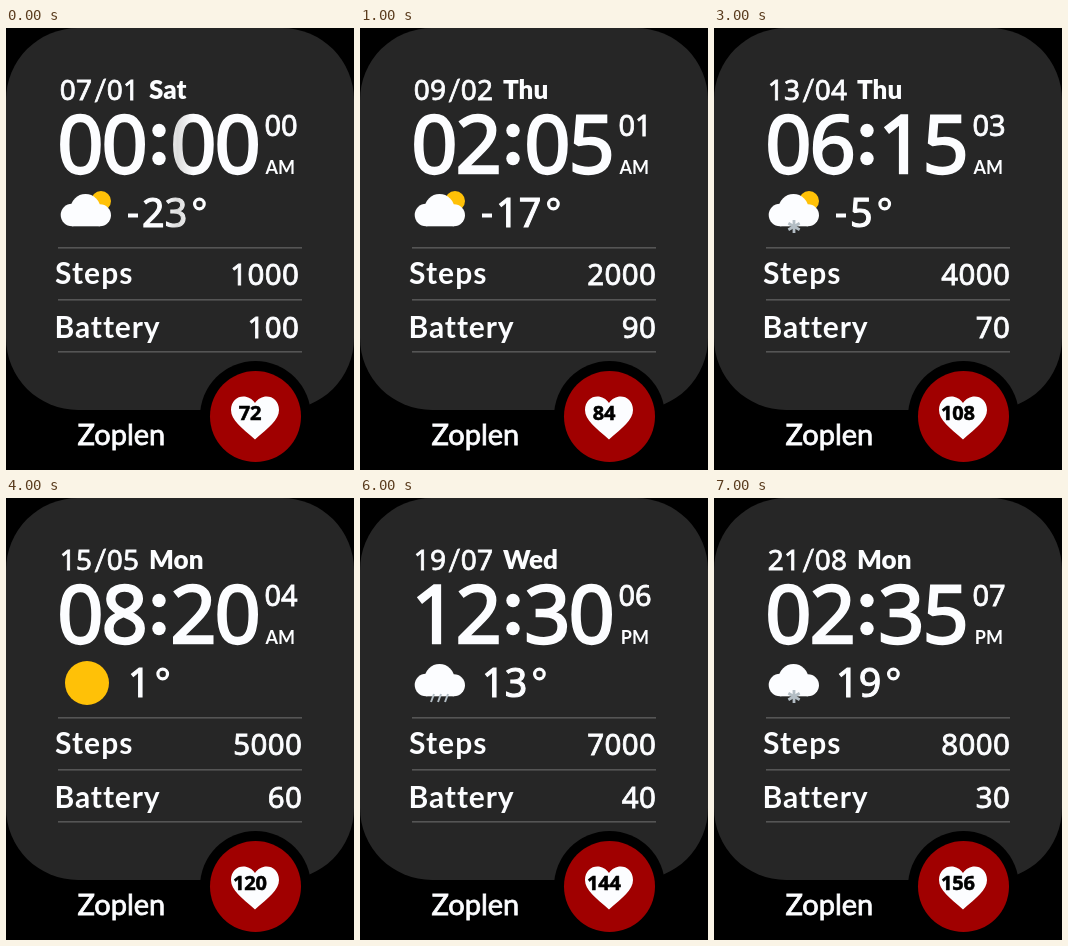
These frames come from a looping animation (348x442 px, 8 s). An HTML page with a canvas:

```html
<!DOCTYPE html>
<html lang="en">
<head>
<meta charset="utf-8">
<title>Watch face</title>
<style>
html, body { margin: 0; width: 100%; height: 100%; overflow: hidden; background: #000; }
canvas { display: block; width: 348px; height: 442px; }
</style>
</head>
<body>
<canvas id="face"></canvas>
<script>
const W = 348, H = 442, STEP = 1000, COUNT = 8;
const WHITE = '#fcfdff', SUN = '#ffc107', PANEL = '#262626', RED = '#a00000';
const DAYS = ['Sat', 'Thu', 'Sat', 'Thu', 'Mon', 'Sat', 'Wed', 'Mon'];
const WEATHER = [
  { cloud: true, sun: true }, { cloud: true, sun: true },
  { cloud: true, sun: true, fall: rain }, { cloud: true, sun: true, fall: snow },
  { sun: true }, { cloud: true },
  { cloud: true, fall: rain }, { cloud: true, fall: snow }
];

const canvas = document.getElementById('face');
const ctx = canvas.getContext('2d');
const ratio = window.devicePixelRatio || 1;
canvas.width = W * ratio;
canvas.height = H * ratio;
ctx.scale(ratio, ratio);

const pad = n => String(n).padStart(2, '0');

function disc(x, y, r, color) {
  ctx.fillStyle = color;
  ctx.beginPath();
  ctx.arc(x, y, r, 0, Math.PI * 2);
  ctx.fill();
}

function line(x1, y1, x2, y2) {
  ctx.beginPath();
  ctx.moveTo(x1, y1);
  ctx.lineTo(x2, y2);
  ctx.stroke();
}

// A thin outline brings the regular cut up to a medium weight.
function medium(str, x, y, size, color) {
  ctx.fillStyle = ctx.strokeStyle = color;
  ctx.lineWidth = size * 0.028;
  ctx.fillText(str, x, y);
  ctx.strokeText(str, x, y);
}

function text(str, x, y, size, weight, spacing = 0) {
  ctx.font = `${weight} ${size}px Lato, sans-serif`;
  ctx.letterSpacing = spacing + 'px';
  if (weight === 400) {
    medium(str, x, y, size, WHITE);
  } else {
    ctx.fillStyle = WHITE;
    ctx.fillText(str, x, y);
  }
  ctx.letterSpacing = '0px';
}

function figures(value, x, y, size, advance, weight = 400, color = WHITE) {
  ctx.font = `${weight} ${size}px "Noto Sans", sans-serif`;
  ctx.textAlign = 'center';
  [...String(value)].forEach((ch, i) => medium(ch, x + (i + 0.5) * advance, y, size, color));
  ctx.textAlign = 'left';
}

function rightFigures(value, y) {
  const str = String(value), advance = 17.2;
  const right = str[0] === '1' ? 293 : 296;
  figures(str, right - str.length * advance, y, 29.5, advance);
}

function rain() {
  ctx.strokeStyle = '#b4bec5';
  ctx.lineWidth = 2;
  for (const x of [73, 80, 87]) line(x + 1, 196, x - 2, 204);
}

function snow() {
  ctx.strokeStyle = '#b4bec5';
  ctx.lineWidth = 2.8;
  for (let i = 0; i < 3; i++) {
    const a = Math.PI / 2 + i * Math.PI / 3;
    const dx = 6.5 * Math.cos(a), dy = 6.5 * Math.sin(a);
    line(80 - dx, 198.5 - dy, 80 + dx, 198.5 + dy);
  }
}

function weather({ cloud, sun, fall }) {
  if (sun) cloud ? disc(95, 173, 10, SUN) : disc(81, 185, 22, SUN);
  if (cloud) {
    disc(66, 187, 11.3, WHITE);
    disc(79.5, 181, 15, WHITE);
    disc(94, 187.3, 11, WHITE);
    ctx.fillRect(66, 183, 28, 15.3);
  }
  if (fall) fall();
}

function panel() {
  ctx.fillStyle = '#000';
  ctx.fillRect(0, 0, W, H);
  ctx.fillStyle = PANEL;
  ctx.beginPath();
  ctx.roundRect(0, 0, W, 382, 72);
  ctx.fill();
  ctx.fillStyle = '#555';
  for (const y of [219, 271, 323]) ctx.fillRect(52, y, 244, 1.6);
  text('Steps', 49, 256, 30, 700, 1.1);
  text('Battery', 48.5, 310, 30, 700, 0.9);
  text('Zoplen', 71.5, 417, 29, 400);
}

function pulse(rate) {
  disc(249.5, 388.5, 55.5, '#000');
  disc(249.5, 388.5, 45.5, RED);
  ctx.fillStyle = WHITE;
  ctx.beginPath();
  ctx.moveTo(249, 411.5);
  ctx.bezierCurveTo(236, 400, 225, 392, 225, 382);
  ctx.bezierCurveTo(225, 367, 242, 364, 249, 375);
  ctx.bezierCurveTo(256, 364, 273, 367, 273, 382);
  ctx.bezierCurveTo(273, 392, 262, 400, 249, 411.5);
  ctx.fill();
  const str = String(rate), advance = 11.2;
  figures(str, 244 - str.length * advance / 2, 391.5, 20, advance, 700, '#000');
}

function shade() {
  const band = ctx.createLinearGradient(158, 0, 188, 0);
  band.addColorStop(0, WHITE);
  band.addColorStop(0.45, '#dcdcdc');
  band.addColorStop(1, WHITE);
  return band;
}

function clock(k) {
  const color = k ? WHITE : shade();
  figures(pad(7 + 2 * k), 53.5, 71.5, 28, 16.3);
  text('/', 88, 71.5, 28, 400);
  figures(pad(k + 1), 100.5, 71.5, 28, 16.3);
  text(DAYS[k], 143, 71, 26, 900);

  figures(pad(k > 6 ? 2 * k - 12 : 2 * k), 52.3, 145, 81, 44.3);
  disc(153, 102.5, 6.7, WHITE);
  disc(153, 130.5, 6.7, WHITE);
  figures(pad(5 * k), 165.3, 145, 81, 44.3, 400, color);
  figures(pad(k), 258.5, 108, 29, 16.6);
  ctx.textAlign = 'right';
  text(k < 6 ? 'AM' : 'PM', 289, 146, 18, 700);
  ctx.textAlign = 'left';

  const degrees = 6 * k - 23, digits = String(Math.abs(degrees));
  const x = degrees < 0 ? 136 : 122;
  if (degrees < 0) {
    ctx.fillStyle = WHITE;
    ctx.fillRect(122, 185.5, 10, 4);
  }
  figures(digits, x, 198.5, 39.5, 22.7, 400, color);
  ctx.strokeStyle = WHITE;
  ctx.lineWidth = 3.2;
  ctx.beginPath();
  ctx.arc(x + digits.length * 22.7 + 12, 176, 4.8, 0, Math.PI * 2);
  ctx.stroke();
}

function draw(now) {
  const k = Math.floor(now / STEP) % COUNT;
  panel();
  clock(k);
  weather(WEATHER[k]);
  rightFigures(1000 * (k + 1), 257);
  rightFigures(100 - 10 * k, 310);
  pulse(72 + 12 * k);
}

const start = performance.now();
function tick() {
  draw(performance.now() - start);
  requestAnimationFrame(tick);
}
tick();
</script>
</body>
</html>
```
